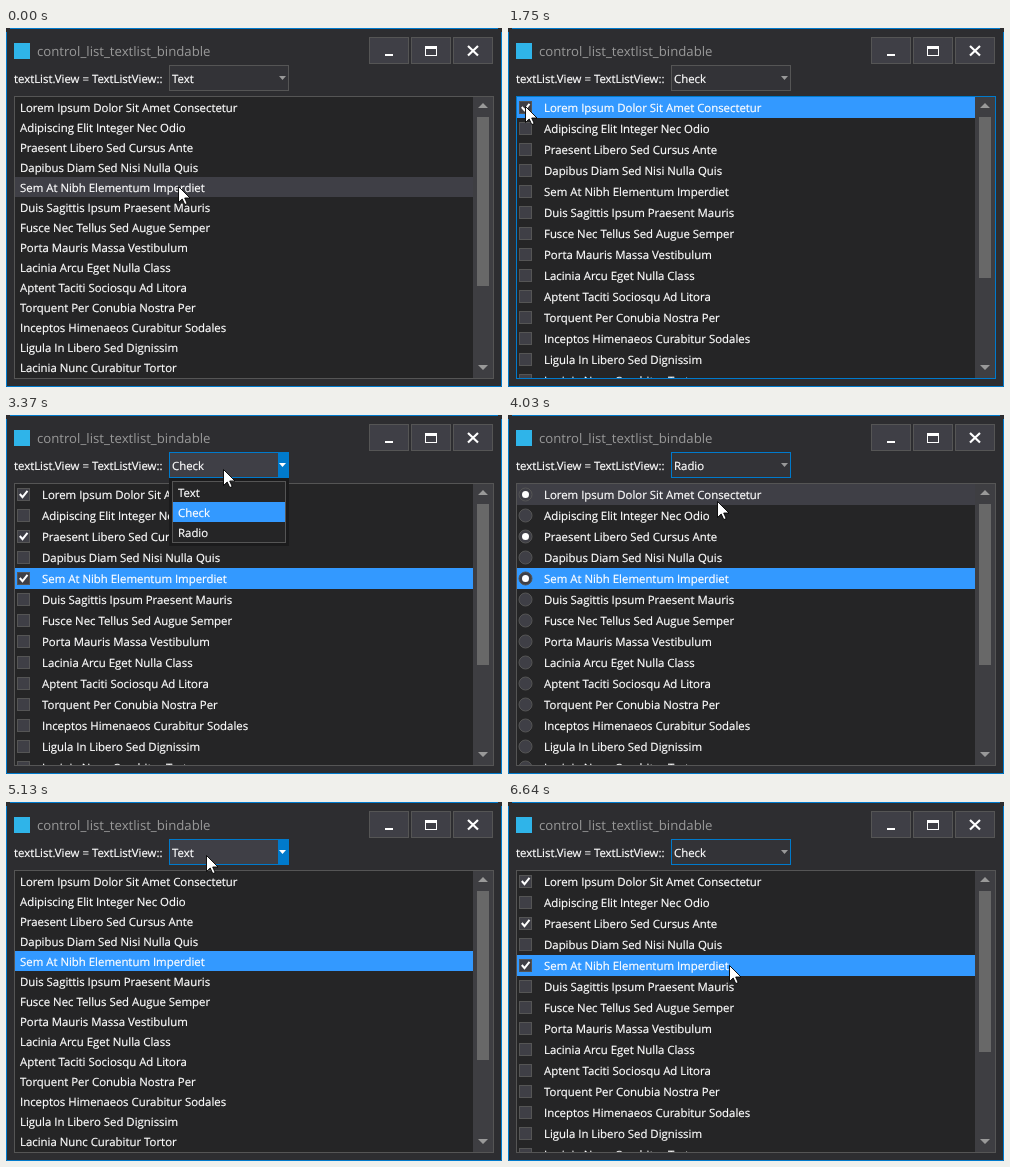
These frames come from a looping animation (496x359 px, 7.1 s). An HTML page:

```html
<!DOCTYPE html>
<html lang="en">
<head>
<meta charset="utf-8">
<title>Text list</title>
<style>
  html, body { margin: 0; width: 100%; height: 100%; overflow: hidden; background: #2d2d30; }
  svg { display: block; width: 496px; height: 359px; }
  text { font: 11.4px "Open Sans", "Noto Sans", sans-serif; fill: #fff; stroke: #fff; stroke-width: .2px;
    text-rendering: geometricPrecision; white-space: pre; }
  .title { font-size: 13.2px; fill: #999; stroke: none; }
</style>
</head>
<body>
<svg id="stage" viewBox="0 0 496 359">
  <defs><clipPath id="view"><rect x="9" y="69" width="458" height="281"/></clipPath></defs>
</svg>
<script>
const LOOP = 7100;
const BLUE = '#007acc', PICK = '#3399ff', RAISED = '#3f3f46', EDGE = '#555', FIELD = '#333337', PAPER = '#252526';
const VIEWS = ['Text', 'Check', 'Radio'];
const LINES = [
  'Lorem Ipsum Dolor Sit Amet Consectetur', 'Adipiscing Elit Integer Nec Odio',
  'Praesent Libero Sed Cursus Ante', 'Dapibus Diam Sed Nisi Nulla Quis',
  'Sem At Nibh Elementum Imperdiet', 'Duis Sagittis Ipsum Praesent Mauris',
  'Fusce Nec Tellus Sed Augue Semper', 'Porta Mauris Massa Vestibulum',
  'Lacinia Arcu Eget Nulla Class', 'Aptent Taciti Sociosqu Ad Litora',
  'Torquent Per Conubia Nostra Per', 'Inceptos Himenaeos Curabitur Sodales',
  'Ligula In Libero Sed Dignissim', 'Lacinia Nunc Curabitur Tortor'
];
const LIST_TOP = 69, MENU_TOP = 67, ITEM = 20;

// Pointer moves: leave, arrive, x, y, time of the press made there.
// Everything else follows from what is pressed.
const HOME = [172, 158];
const MOVES = [
  [160, 700, 190, 52, 735],
  [735, 1010, 188, 96, 1190],
  [1190, 1610, 17, 78, 1750],
  [1750, 2200, 17, 117, 2250],
  [2345, 2520, 18, 163, 2750],
  [2750, 3290, 217, 54, 3300],
  [3400, 3690, 209, 108, 3870],
  [3870, 4250, 208, 52, 4400],
  [4400, 4600, 207, 78, 4830],
  [4830, 5170, 200, 52, 5400],
  [5400, 5900, 203, 98, 6130],
  [6440, 6640, 221, 163, LOOP]
];

const stage = document.getElementById('stage');

function set(node, attrs) {
  for (const key in attrs) node.setAttribute(key, attrs[key]);
  return node;
}
function add(parent, tag, attrs = {}, content = '') {
  const node = set(document.createElementNS('http://www.w3.org/2000/svg', tag), attrs);
  node.textContent = content;
  return parent.appendChild(node);
}
const show = (node, on) => set(node, { display: on ? 'inline' : 'none' });
const box = (parent, x, y, width, height, fill) => add(parent, 'rect', { x, y, width, height, fill });
const frame = (parent, x, y, w, h, fill, stroke) =>
  set(box(parent, x + .5, y + .5, w - 1, h - 1, fill), { stroke });
const path = (parent, d, fill, stroke = 'none', width = 1) =>
  add(parent, 'path', { d, fill, stroke, 'stroke-width': width });
const disc = (parent, r, fill, stroke = 'none') =>
  add(parent, 'circle', { cx: 17.5, cy: 10.5, r, fill, stroke });
const label = (parent, x, y, str) => add(parent, 'text', { x, y }, str);

// Window and title bar
path(stage, 'M4 .5H492M.5 4V358.5H495.5V4', 'none', BLUE);
box(stage, 8, 15, 16, 16, '#2fb4e9');
set(label(stage, 31, 28, 'control_list_textlist_bindable'), { class: 'title' });
for (const x of [363, 405, 447]) frame(stage, x, 9, 40, 27, RAISED, EDGE);
box(stage, 379, 26, 8, 2, '#fff');
set(path(stage, 'M419 18h12v10h-12zM420 21v6h10v-6z', '#fff'), { 'fill-rule': 'evenodd' });
path(stage, 'M462 18l10 9.5M472 18l-10 9.5', 'none', '#fff', 2.2);
label(stage, 8, 55, 'textList.View = TextListView::');

// Combo box
const combo = frame(stage, 163, 37, 120, 26, FIELD, EDGE);
const comboButton = box(stage, 272, 38, 10, 24, BLUE);
const comboArrow = path(stage, 'M273 48h7l-3.5 4z', '#999');
const comboText = label(stage, 166, 55, VIEWS[0]);

// List with scroll bar
const list = frame(stage, 8, 68, 480, 283, PAPER, EDGE);
box(stage, 467, 69, 20, 281, '#3e3e42');
path(stage, 'M472 80h10l-5 -5zM472 337h10l-5 5z', '#999');
const thumb = box(stage, 471, 89, 12, 169, '#686868');
const rowLayer = add(stage, 'g', { 'clip-path': 'url(#view)' });
const rows = LINES.map(str => {
  const g = add(rowLayer, 'g');
  const back = box(g, 9, 0, 458, 20, 'none');
  const check = add(g, 'g'), radio = add(g, 'g');
  frame(check, 11, 4, 13, 13, RAISED, EDGE);
  disc(radio, 6.5, RAISED, EDGE);
  const tick = path(check, 'M13.8 10l2.7 3.2l5 -6.4', 'none', '#fff', 2);
  const dot = disc(radio, 3.5, '#fff');
  return { g, back, check, radio, tick, dot, text: label(g, 14, 15, str) };
});

// Drop-down
const menu = add(stage, 'g');
box(menu, 163, 63, 120, 68, '#1b1b1c');
frame(menu, 166, 66, 114, 62, PAPER, EDGE);
const items = VIEWS.map((name, i) => {
  const back = box(menu, 167, MENU_TOP + ITEM * i, 112, ITEM, 'none');
  label(menu, 172, 82 + ITEM * i, name);
  return back;
});

const pointer = path(stage, 'M.5 .5V16.5L4.2 13L6.8 18.6L9.2 17.5L6.7 12H12Z', '#fff', '#000', .9);

const rowHeight = mode => mode ? 21 : 20;
const inCombo = (x, y) => x >= 163 && x < 283 && y >= 37 && y < 63;
const itemAt = y => Math.floor((y - MENU_TOP) / ITEM);
const rowAt = (y, mode) => y < LIST_TOP ? -1 : Math.floor((y - LIST_TOP) / rowHeight(mode));

function pointerAt(t) {
  let [x, y] = HOME;
  for (const [leave, arrive, toX, toY] of MOVES) {
    const u = Math.min(1, Math.max(0, (t - leave) / (arrive - leave)));
    const ease = u * u * (3 - 2 * u);
    x += (toX - x) * ease;
    y += (toY - y) * ease;
  }
  return [Math.round(x), Math.round(y)];
}

// Replay all presses made up to time t
function stateAt(t) {
  const state = { mode: 0, open: false, focus: '', picked: -1, marked: new Set() };
  for (const [, , x, y, press] of MOVES) {
    if (press > t) break;
    if (inCombo(x, y)) {
      state.open = true;
      state.focus = 'combo';
    } else if (state.open) {
      state.mode = itemAt(y);
      state.open = false;
    } else {
      state.picked = rowAt(y, state.mode);
      state.marked.add(state.picked);
      state.focus = 'list';
    }
  }
  return state;
}

function draw(t) {
  const [x, y] = pointerAt(t);
  const { mode, open, focus, picked, marked } = stateAt(t);
  const active = open || inCombo(x, y);
  const height = rowHeight(mode);
  const hovered = open ? -1 : rowAt(y, mode);

  set(combo, { fill: active ? RAISED : FIELD, stroke: active || focus === 'combo' ? BLUE : EDGE });
  show(comboButton, active);
  set(comboArrow, { fill: active ? '#fff' : '#999' });
  comboText.textContent = VIEWS[mode];

  set(list, { stroke: focus === 'list' ? BLUE : EDGE });
  set(thumb, { height: mode ? 161 : 169 });
  rows.forEach((row, i) => {
    set(row.g, { transform: `translate(0 ${LIST_TOP + height * i})` });
    set(row.back, { height, fill: i === picked ? PICK : i === hovered ? RAISED : 'none' });
    set(row.text, { x: mode ? 36 : 14 });
    show(row.check, mode === 1);
    show(row.radio, mode === 2);
    show(row.tick, marked.has(i));
    show(row.dot, marked.has(i));
  });

  show(menu, open);
  items.forEach((back, i) => set(back, { fill: i === mode ? PICK : i === itemAt(y) ? RAISED : 'none' }));
  set(pointer, { transform: `translate(${x} ${y})` });
}

const begin = performance.now();
function tick() {
  draw((performance.now() - begin) % LOOP);
  requestAnimationFrame(tick);
}
tick();
</script>
</body>
</html>
```
